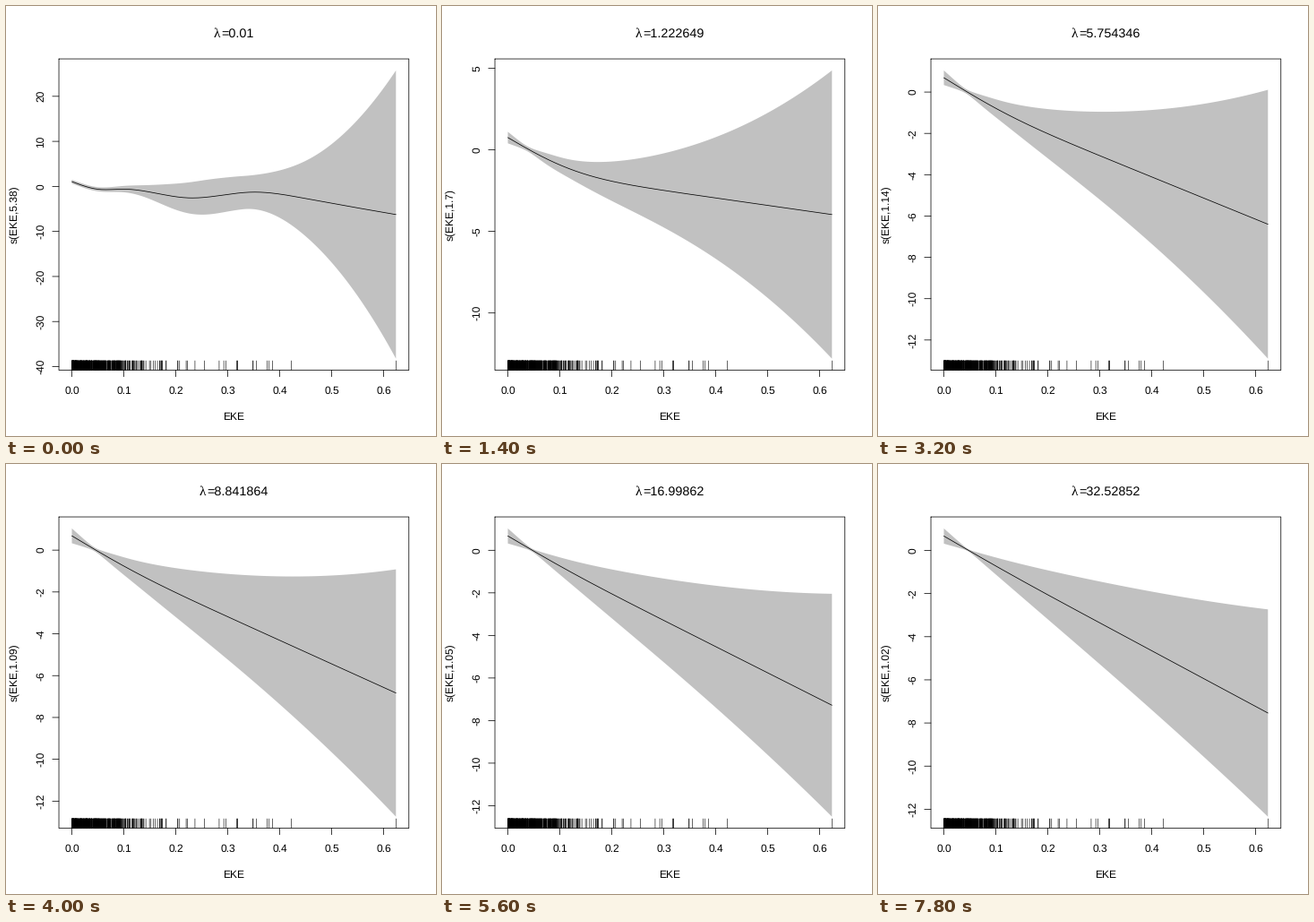
Write a matplotlib script that moves like this. It is 480 by 480 pixels and loops after 8000 ms.

```python
import math

import matplotlib.pyplot as plt
import numpy as np
from matplotlib.animation import FuncAnimation

plt.rcParams["font.family"] = "Liberation Sans"
plt.rcParams["text.hinting"] = "none"

SIZE, DPI = 480, 96
PT = 72 / DPI                     # points per pixel
FRAMES, INTERVAL = 40, 200

LEFT, RIGHT, TOP, BOTTOM = 59.04, 449.76, 59.04, 406.56
X_MAX = 0.6237
PAD = 0.04                        # share of the data range left free on each side
TICK = 7.2


def spline(x, xs, ys):
    """Natural cubic spline through (xs, ys), evaluated at x."""
    xs, ys = np.asarray(xs, float), np.asarray(ys, float)
    h, n = np.diff(xs), len(xs)
    slope = np.diff(ys) / h
    a, rhs = np.eye(n), np.zeros(n)
    for i in range(1, n - 1):
        a[i, i - 1:i + 2] = h[i - 1], 2 * (h[i - 1] + h[i]), h[i]
        rhs[i] = 6 * (slope[i] - slope[i - 1])
    m = np.linalg.solve(a, rhs)
    k = np.clip(np.searchsorted(xs, x) - 1, 0, n - 2)
    d, e = x - xs[k], xs[k + 1] - x
    return ((m[k] * e**3 + m[k + 1] * d**3) / (6 * h[k])
            + (ys[k] / h[k] - m[k] * h[k] / 6) * e
            + (ys[k + 1] / h[k] - m[k + 1] * h[k] / 6) * d)


def bump(x, centre, width):
    return np.exp(-((x - centre) / width) ** 2)


def lam_at(i):
    return (0.1 + 0.143676362 * i) ** 2


def edf(lam):
    return 1 + 0.923 * lam**-1.06 * (1 - math.exp(-2.327 * lam**0.9013))


LAM_ROUGH, LAM_MID, LAM_STIFF = lam_at(0), lam_at(7), lam_at(11)

# Smooth fit: a straight limit, one slow bend, and fast wiggles at small lambda.
x = np.linspace(0, X_MAX, 240)
straight = 0.66 - 13.64 * x
bend = 0.09 + 9.1 * x - 1.886 * np.vectorize(math.erf)(x / 0.152)
rough = spline(x, [0, .05, .1, .225, .345, .45, X_MAX],
               [1.06, -.62, -.6, -2.55, -1.28, -2.7, -6.25])


def bend_gain(lam):
    return 1.825 / (1 + 0.675 * lam)


def wiggle_gain(lam):
    def decay(v):
        return (1 + 10 * v) ** -1.5
    low = decay(LAM_MID)
    return max(0, (decay(lam) - low) / (decay(LAM_ROUGH) - low))


wiggle = rough - straight - bend_gain(LAM_ROUGH) * bend

# Half width of the band: a pinched straight part plus a widening tail.
straight_half = 7.37 * (x - 0.048)
rough_half = (0.4 + 3.25 / (1 + np.exp((0.168 - x) / 0.03))
              + 0.35 * bump(x, 0.26, 0.05)
              + 28.35 * (np.maximum(0, x - 0.33) / (X_MAX - 0.33)) ** 2)


def tail(size, power):
    rise = np.maximum(0, x - 0.04) / (X_MAX - 0.04)
    return size * (rise**power + 0.035 * bump(x, 0.08, 0.05))


def log_share(lam, a, b):
    return min(1, max(0, math.log(lam / a) / math.log(b / a)))


def half_width(lam):
    stiff = math.sqrt(129.5 / (1 + 0.751 * max(lam, LAM_STIFF)))
    t = log_share(lam, LAM_MID, LAM_STIFF)
    half = np.hypot(straight_half, (1 - t) * tail(7.746, 2.2) + t * tail(stiff, 1.93))
    t = log_share(lam, LAM_ROUGH, LAM_MID)
    t += 0.15 * t * (1 - t)
    return rough_half ** (1 - t) * half ** t


def fit(lam):
    mid = straight + bend_gain(lam) * bend + wiggle_gain(lam) * wiggle
    half = half_width(lam)
    return mid, mid - half, mid + half


def tick_step(span):
    cell = span / 5
    base = 10 ** math.floor(math.log10(cell))
    unit = base
    for factor, bias in ((2, .8), (5, 1.7), (10, .8)):
        if factor * base - cell >= bias * (cell - unit):
            break
        unit = factor * base
    return unit


fig = plt.figure(figsize=(SIZE / DPI, SIZE / DPI), dpi=DPI, facecolor="white")
ax = fig.add_axes([0, 0, 1, 1])
ax.set_xlim(0, SIZE)
ax.set_ylim(SIZE, 0)
ax.axis("off")


def label(px, py, s="", size=12, **kw):
    kw = {"ha": "center", "va": "baseline", "color": "black", **kw}
    return ax.text(px, py, s, fontsize=size * PT, **kw)


def side_label(px, py, s=""):
    return label(px, py, s, rotation=90, rotation_mode="anchor")


def stroke(px, py):
    line, = ax.plot(px, py, color="black", lw=0.75 * PT, snap=False,
                    solid_capstyle="round", solid_joinstyle="round")
    return line


inner = (RIGHT - LEFT) / (1 + 2 * PAD)
X0 = LEFT + PAD * inner


def to_px(v):
    return X0 + np.asarray(v) * inner / X_MAX


px = to_px(x)
band, = ax.fill(np.r_[px, px[::-1]], np.zeros(2 * len(px)), color="#c1c1c1", lw=0)
curve = stroke(px, np.zeros(len(px)))

# Rug: a dense decaying cluster, small groups further out, a few lone values.
rng = np.random.default_rng(5)
dense = rng.exponential(0.055, 450)
groups = [rng.normal(c, 0.006, 3) for c in (.207, .226, .286, .317, .345, .385)]
rug = np.r_[dense[dense < 0.187], np.concatenate(groups), .255, .422, X_MAX]
ax.vlines(to_px(rug), 395.8, BOTTOM, color="black", lw=0.6 * PT).set_snap(False)

stroke([LEFT, RIGHT, RIGHT, LEFT, LEFT], [TOP, TOP, BOTTOM, BOTTOM, TOP])

for k in range(7):
    at = to_px(k / 10)
    stroke([at, at], [BOTTOM, BOTTOM + TICK])
    label(at, 432.7, f"{k / 10:.1f}")

CX, CY = (LEFT + RIGHT) / 2, (TOP + BOTTOM) / 2
label(CX, 461.7, "EKE")
y_title = side_label(13, CY)
y_ticks = stroke([], [])
y_labels = [side_label(42, CY) for _ in range(12)]

TITLE = 14.4
title_sign = label(CX, 35, "λ", TITLE * 1.07, ha="left", family="Liberation Serif")
title_value = label(CX, 35, "", TITLE, ha="left")


def set_title(lam):
    value = f"{lam:.7g}"
    digits = len(value) - 1
    sign = 0.549 * TITLE
    width = sign + (0.584 + 0.278 + 0.556 * digits) * TITLE
    title_sign.set_x(CX - width / 2 - 0.3)
    title_value.set_x(CX - width / 2 + sign)
    title_value.set_text("=" + value)


def set_axis(lo, hi, to_py):
    step = tick_step(hi - lo)
    values = [k * step for k in range(math.ceil(lo / step), math.floor(hi / step) + 1)]
    xs, ys = [], []
    for v in values:
        xs += [LEFT - TICK, LEFT, np.nan]
        ys += [to_py(v), to_py(v), np.nan]
    y_ticks.set_data(xs, ys)
    for k, text in enumerate(y_labels):
        text.set_visible(k < len(values))
        if k < len(values):
            text.set_text(f"{values[k]:g}")
            text.set_y(to_py(values[k]))


def update(i):
    lam = lam_at(i)
    mid, low, high = fit(lam)
    pad = PAD * (high.max() - low.min())
    lo, hi = low.min() - pad, high.max() + pad

    def to_py(v):
        return BOTTOM - (v - lo) / (hi - lo) * (BOTTOM - TOP)

    band.set_xy(np.c_[np.r_[px, px[::-1]], to_py(np.r_[low, high[::-1]])])
    curve.set_ydata(to_py(mid))
    set_axis(lo, hi, to_py)
    set_title(lam)
    y_title.set_text(f"s(EKE,{round(edf(lam), 2):g})")
    return band, curve


anim = FuncAnimation(fig, update, frames=FRAMES, interval=INTERVAL,
                     repeat=True, repeat_delay=0, blit=False)
plt.show()
```
